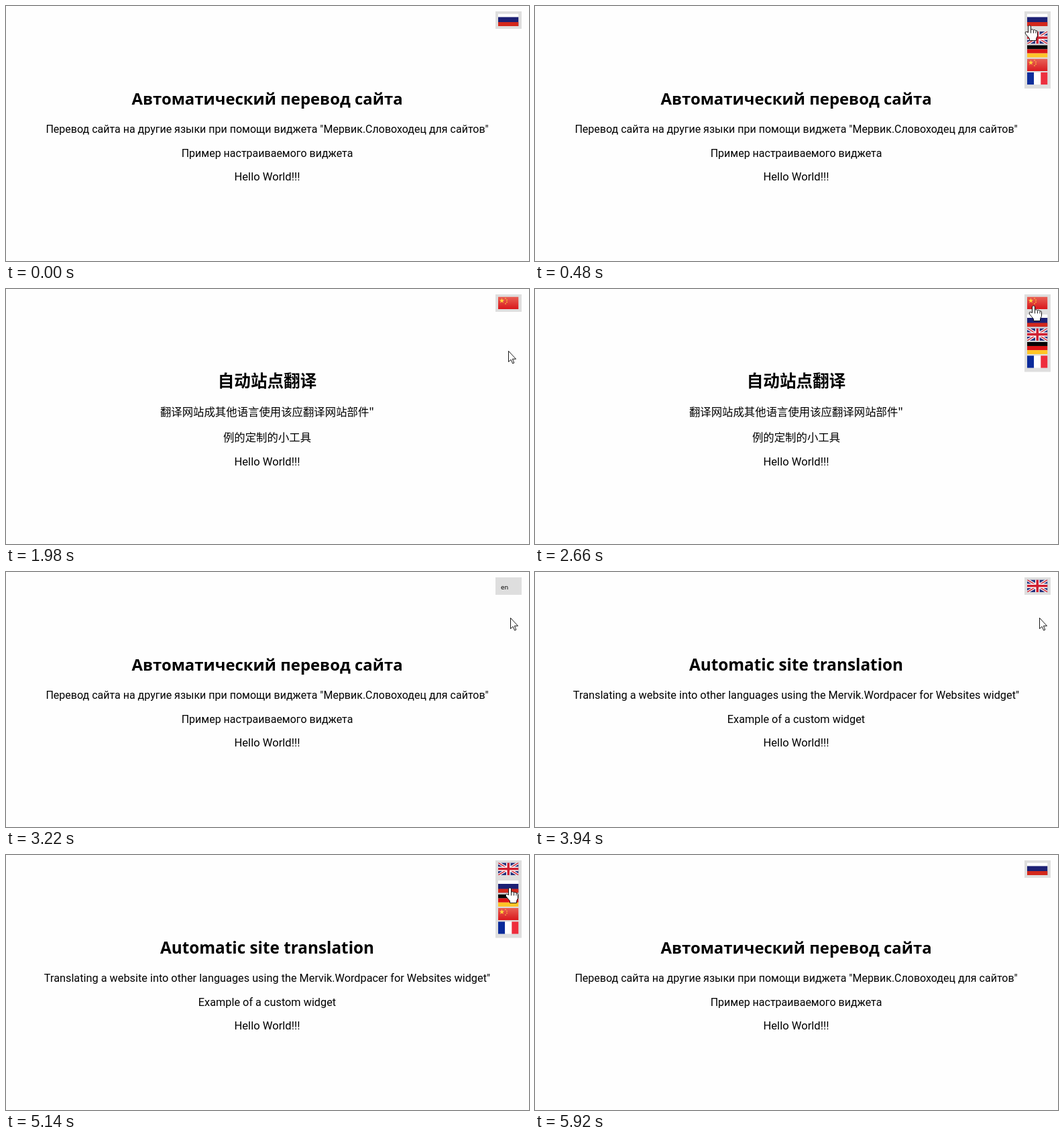
Recreate the animation shown at these times as an HTML page with a canvas. Size 780 by 380 pixels, loop 6020 ms.

```html
<!DOCTYPE html>
<html lang="ru">
<head>
<meta charset="utf-8">
<title>Site translation widget</title>
<style>
  html, body { margin: 0; width: 100%; height: 100%; overflow: hidden; background: #fefefe; }
  canvas { display: block; }
</style>
</head>
<body>
<canvas id="stage" width="780" height="380"></canvas>
<script>
const ctx = document.getElementById('stage').getContext('2d');
const LOOP = 6020;
const HEAD = '"Noto Sans", "Open Sans", sans-serif';
const BODY = 'Roboto, "Noto Sans", sans-serif';
const CJK = '"Noto Sans CJK SC", "Noto Sans CJK", sans-serif';

// Each line: text, baseline, font
const hello = y => ['Hello World!!!', y, `16.6px ${BODY}`];
const pages = {
  ru: [
    ['Автоматический перевод сайта', 147, `bold 23.9px ${HEAD}`],
    ['Перевод сайта на другие языки при помощи виджета "Мервик.Словоходец для сайтов"', 189, `16px ${BODY}`],
    ['Пример настраиваемого виджета', 225, `16px ${BODY}`],
    hello(260)
  ],
  zh: [
    ['自动站点翻译', 146, `bold 24.6px ${CJK}`],
    ['翻译网站成其他语言使用该应翻译网站部件"', 189, `16.4px ${CJK}`],
    ['例的定制的小工具', 227, `16.4px ${CJK}`],
    hello(263)
  ],
  en: [
    ['Automatic site translation', 147, `bold 24.3px ${HEAD}`],
    ['Translating a website into other languages using the Mervik.Wordpacer for Websites widget"', 189, `16.3px ${BODY}`],
    ['Example of a custom widget', 225, `16.3px ${BODY}`],
    hello(260)
  ]
};
const languages = ['ru', 'en', 'de', 'zh', 'fr'];

// Page language, selected flag, alt text shown while the flag loads
const textSteps = [[0, 'ru'], [1920, 'zh'], [3200, 'ru'], [3840, 'en'], [5240, 'ru']];
const flagSteps = [[0, 'ru'], [1220, 'zh'], [3200, 'en'], [5240, 'ru']];
const loading = [[1220, 1260], [3200, 3280], [5240, 5280]];
const menus = [[290, 1220], [2460, 3200], [4388, 5240]];
const OPEN_MS = 200;

const cursorPath = [
  [20, 700, 319], [320, 737, 30], [480, 738, 28], [640, 738, 28],
  [1000, 750, 92], [2360, 750, 92], [2480, 746, 31], [2660, 744, 24],
  [2960, 744, 24], [3160, 753, 68], [4360, 753, 68], [4420, 751, 34],
  [4560, 749, 16], [4960, 749, 18], [5140, 752, 48], [5560, 752, 48],
  [5920, 715, 385]
];

const ARROW = new Path2D('M0 0V16L3.6 12.8 6.2 18.5 8.3 17.6 5.9 11.8H11Z');
const HAND = new Path2D('M-2 11V1.5Q0 -1 2 1.5V7Q4 5 6 7.5Q8 6 9.5 8.5' +
  'Q11.5 7.5 12 10V16L10 20V23H0V20L-6 13Q-7 9 -4 10Z');
const KNUCKLES = new Path2D('M2 7V12M6 8V12M9.5 9V12');

const stepAt = (steps, t) => steps.filter(s => s[0] <= t).pop()[1];
const within = (t, [from, to]) => t >= from && t < to;

function rect(color, x, y, w, h) {
  ctx.fillStyle = color;
  ctx.fillRect(x, y, w, h);
}

function line(color, width, x1, y1, x2, y2) {
  ctx.strokeStyle = color;
  ctx.lineWidth = width;
  ctx.beginPath();
  ctx.moveTo(x1, y1);
  ctx.lineTo(x2, y2);
  ctx.stroke();
}

function star(x, y, r) {
  ctx.fillStyle = '#ffd83a';
  ctx.beginPath();
  for (let i = 0; i < 10; i++) {
    const a = i * Math.PI / 5 - Math.PI / 2;
    const d = i % 2 ? r * 0.4 : r;
    ctx.lineTo(x + d * Math.cos(a), y + d * Math.sin(a));
  }
  ctx.fill();
}

const flags = {
  ru(w, h) {
    rect('#ffffff', 0, 0, w, h);
    rect('#1c2074', 0, 5, w, h - 5);
    rect('#d3281c', 0, 12.5, w, h - 12.5);
  },
  de(w, h) {
    ['#050505', '#dd1414', '#ffc526'].forEach((c, i) => rect(c, 0, i * h / 3, w, h / 3));
  },
  fr(w, h) {
    ['#0a2a9a', '#ffffff', '#ee2d3c'].forEach((c, i) => rect(c, i * w / 3, 0, w / 3, h));
  },
  zh(w, h) {
    const red = ctx.createLinearGradient(0, 0, 0, h);
    red.addColorStop(0, '#e96055');
    red.addColorStop(1, '#d9171c');
    rect(red, 0, 0, w, h);
    star(5.5, 6, 4);
    for (const [x, y] of [[11, 2.5], [13, 5], [13, 8], [11, 10.5]]) star(x, y, 1.3);
  },
  en(w, h) {
    rect('#25307c', 0, 0, w, h);
    for (const [color, width] of [['#ffffff', 4], ['#cf2b3a', 1.5]]) {
      line(color, width, 0, 0, w, h);
      line(color, width, 0, h, w, 0);
    }
    for (const [color, width] of [['#ffffff', 6.5], ['#cf2032', 3.6]]) {
      line(color, width, w / 2, 0, w / 2, h);
      line(color, width, 0, h / 2, w, h / 2);
    }
  }
};

function drawFlag(name, y, height, alpha) {
  ctx.save();
  ctx.globalAlpha = alpha;
  ctx.translate(734, y);
  ctx.beginPath();
  ctx.rect(0, 0, 30.5, height);
  ctx.clip();
  flags[name](30.5, 18.5);
  ctx.restore();
}

function openness(t) {
  const menu = menus.find(m => within(t, m));
  if (!menu) return 0;
  const p = Math.min(1, (t - menu[0]) / OPEN_MS);
  return 0.5 - Math.cos(Math.PI * p) / 2;
}

function drawWidget(t) {
  const current = stepAt(flagSteps, t);
  const open = openness(t);
  rect('#dedede', 730, 8, 39, 26 + 89.5 * open);
  if (loading.some(span => within(t, span))) {
    ctx.fillStyle = '#000';
    ctx.font = '9px "DejaVu Sans", sans-serif';
    ctx.textAlign = 'left';
    ctx.fillText(current, 738, 25.5);
  } else {
    drawFlag(current, 11.5, 18.5, 1);
  }
  if (open > 0) {
    languages.filter(l => l !== current).forEach((l, i) =>
      drawFlag(l, 34 + (4 + 20.4 * i) * open, 18.5 * open, open ** 4));
  }
}

function drawPage(t) {
  ctx.fillStyle = '#000';
  ctx.textAlign = 'center';
  for (const [text, y, font] of pages[stepAt(textSteps, t)]) {
    ctx.font = font;
    ctx.fillText(text, 389.5, y);
  }
}

function cursorAt(t) {
  const i = cursorPath.findIndex(p => p[0] > t);
  if (i < 1) return null;
  const [t0, x0, y0] = cursorPath[i - 1];
  const [t1, x1, y1] = cursorPath[i];
  const p = (t - t0) / (t1 - t0);
  const e = p * p * (3 - 2 * p);
  return [x0 + (x1 - x0) * e, y0 + (y1 - y0) * e];
}

function drawCursor(t) {
  const pos = cursorAt(t);
  if (!pos) return;
  const [x, y] = pos;
  const bottom = 34 + 89 * openness(t);
  const overWidget = x > 730 && x < 769 && y > 8 && y < bottom;
  const shape = overWidget ? HAND : ARROW;
  ctx.save();
  ctx.translate(Math.round(x) - 0.5, Math.round(y) + 0.5);
  ctx.fillStyle = '#fff';
  ctx.strokeStyle = '#000';
  ctx.lineWidth = 0.9;
  ctx.fill(shape);
  ctx.stroke(shape);
  if (overWidget) ctx.stroke(KNUCKLES);
  ctx.restore();
}

function draw(now) {
  const t = now % LOOP;
  rect('#fefefe', 0, 0, 780, 380);
  drawPage(t);
  drawWidget(t);
  drawCursor(t);
}

let start;
function tick(now) {
  start ??= now;
  draw(now - start);
  requestAnimationFrame(tick);
}
draw(0);
requestAnimationFrame(tick);
</script>
</body>
</html>
```
